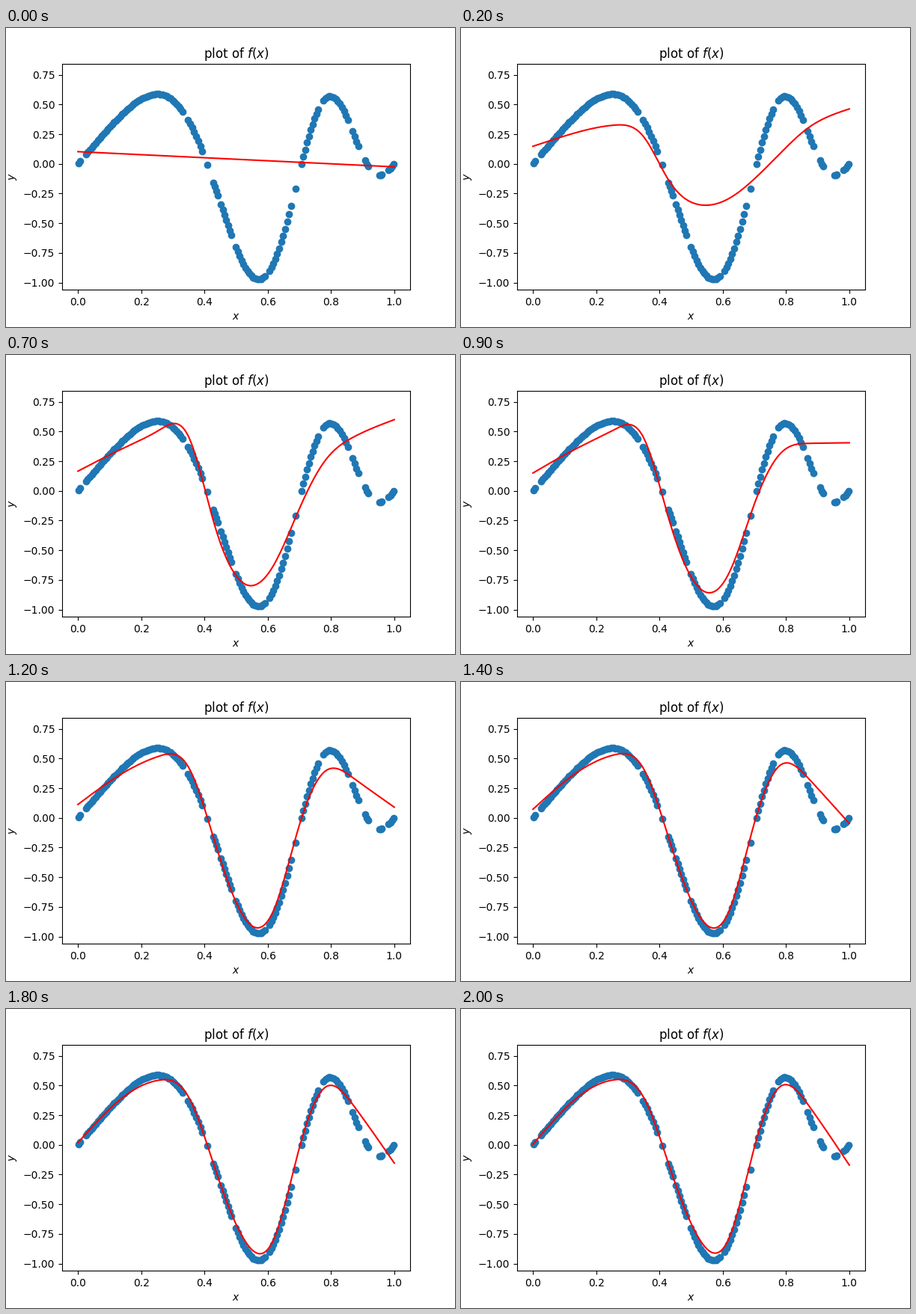
Animation, 600 px wide and 400 px high, one loop 2100 ms. Source, as a matplotlib script:

```python
import numpy as np
import matplotlib.pyplot as plt
from matplotlib.animation import FuncAnimation

FRAMES, INTERVAL = 21, 100

# stretches of x that hold samples, and the spacing within them
RUNS = [(.002, .007), (.025, .331), (.348, .393), (.409, .409), (.429, .442),
        (.452, .485), (.499, .591), (.605, .674), (.688, .688), (.707, .760),
        (.776, .854), (.868, .887), (.907, .918), (.954, .961), (.982, .999)]
SPACING = .0065

# the fitted curve: key heights at a few stages of training
KNOTS = np.array([0, .13, .26, .35, .43, .53, .62, .70, .78, .87, 1])
STAGES = np.array([0, 4, 7, 12, 16, 20])
FITS = np.array([
    .103 - .128 * KNOTS,
    [.175, .362, .493, .365, -.26, -.636, -.522, -.21, .16, .49, .756],
    [.166, .342, .517, .455, -.27, -.788, -.62, -.15, .25, .452, .60],
    [.113, .358, .523, .425, -.18, -.855, -.77, -.06, .39, .337, .09],
    [.035, .372, .543, .405, -.175, -.825, -.79, -.03, .473, .335, -.13],
    [.005, .376, .549, .400, -.17, -.81, -.785, -.02, .488, .338, -.17],
])
GRID = np.linspace(0, 1, 300)


def f(x):
    return np.sin(np.pi * x) * np.cos(3 * np.pi * x ** 2)


def samples():
    return np.concatenate([np.linspace(a, b, 1 + int(np.ceil((b - a) / SPACING)))
                           for a, b in RUNS])


def hermite(x, knots, y, m):
    """Cubic pieces through y with slopes m at the knots."""
    i = np.clip(np.searchsorted(knots, x, side="right") - 1, 0, len(knots) - 2)
    h = knots[i + 1] - knots[i]
    t = (x - knots[i]) / h
    return ((1 + 2 * t) * (1 - t) ** 2 * y[i] + t ** 2 * (3 - 2 * t) * y[i + 1]
            + h * t * (1 - t) * ((1 - t) * m[i] - t * m[i + 1]))


def monotone_slopes(x, y):
    """Slopes that never overshoot, one column per curve."""
    d = np.diff(y, axis=0) / np.diff(x)[:, None]
    a, b = d[:-1], d[1:]
    same = a * b > 0
    mid = np.where(same, 2 * a * b / np.where(same, a + b, 1), 0)
    return np.vstack([d[:1], mid, d[-1:]])


def natural_slopes(x, y):
    """Slopes of the natural cubic spline."""
    h = np.diff(x)
    d = np.diff(y) / h
    A = np.diag(np.r_[2, 2 * (h[:-1] + h[1:]), 2])
    A += np.diag(np.r_[1, h[:-1]], 1) + np.diag(np.r_[h[1:], 1], -1)
    r = 3 * np.r_[d[0], h[1:] * d[:-1] + h[:-1] * d[1:], d[-1]]
    return np.linalg.solve(A, r)


RATES = monotone_slopes(STAGES, FITS)


def curve(n):
    y = hermite(n, STAGES, FITS, RATES)
    return hermite(GRID, KNOTS, y, natural_slopes(KNOTS, y))


fig, ax = plt.subplots(figsize=(6, 4), dpi=100)
fig.subplots_adjust(left=.125, right=.9, bottom=.125, top=.88)
x = samples()
ax.scatter(x, f(x))
line, = ax.plot(GRID, curve(0), color="red")
ax.set(xlim=(-.05, 1.05), ylim=(-1.05935, .84245),
       title="plot of $f(x)$", xlabel="$x$", ylabel="$y$")


def update(n):
    line.set_ydata(curve(n))
    return line,


anim = FuncAnimation(fig, update, frames=FRAMES, interval=INTERVAL,
                     repeat=True, repeat_delay=0)
plt.show()
```
